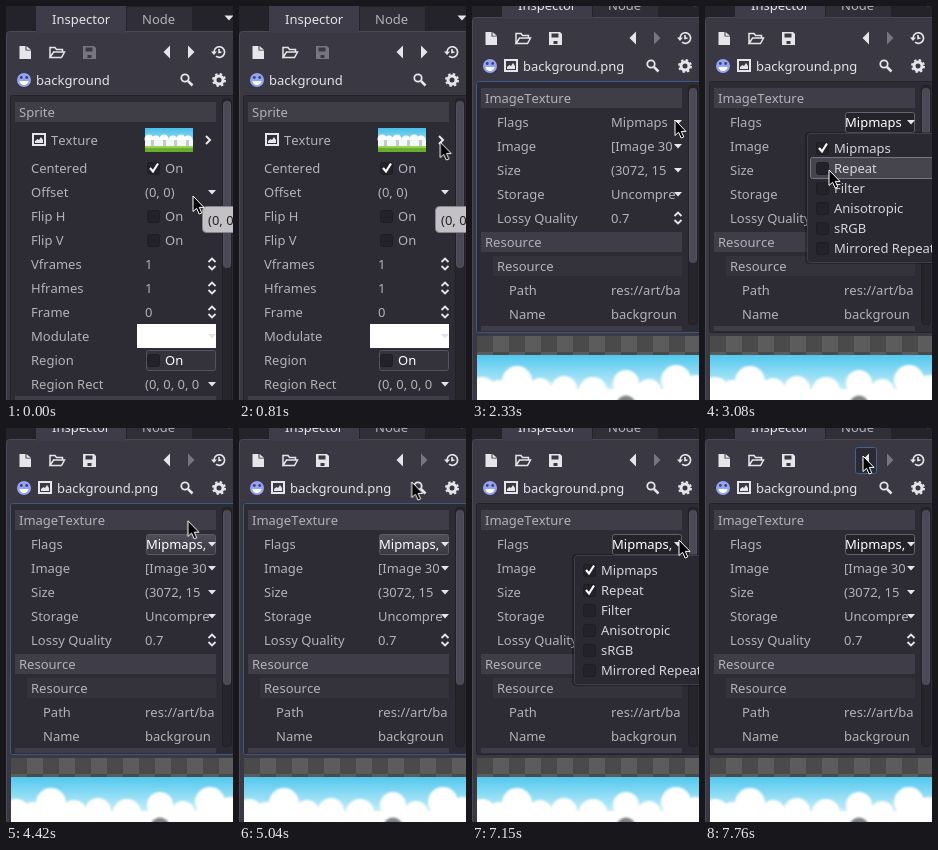
Animation, 227 px wide and 394 px high, one loop 8 s. Source, as an HTML page:

```html
<!DOCTYPE html>
<html lang="en">
<head>
<meta charset="utf-8">
<title>Inspector</title>
<style>
html, body { margin: 0; width: 100%; height: 100%; overflow: hidden; background: #25232a; }
svg { display: block; width: 227px; height: 394px; }
text { font: 13px "Noto Sans", "Open Sans", sans-serif; font-kerning: none; fill: #b4b2b8; white-space: pre; }
.lit { fill: #fff; }
.title { fill: #e4e3e8; }
.item { fill: #d6d5da; }
.clouds { filter: blur(1.3px); }

/* hard switches between states */
.sprite, .tip, .tex, .focus, .popup, .plain, .one, .two, .press, .soft, .back, .hover, .head {
  animation: 8s step-end infinite;
}
.head { animation-name: head; }
.sprite { animation-name: sprite; }
.tip { animation-name: tip; }
.tex { animation-name: tex; }
.focus { animation-name: focus; }
.popup { animation-name: popup; }
.plain { animation-name: plain; }
.one { animation-name: one; }
.two { animation-name: two; }
.press { animation-name: press; }
.soft { animation-name: soft; }
.back { animation-name: back; }
.hover { animation-name: hover; }
@keyframes head { 0% { transform: translate(0, 0); } 15.75%, 100% { transform: translate(0, -14px); } }
@keyframes sprite { 0% { opacity: 1; } 15.75%, 100% { opacity: 0; } }
@keyframes tip { 0% { opacity: 1; } 14.25%, 100% { opacity: 0; } }
@keyframes tex { 0% { opacity: 0; } 15.75%, 100% { opacity: 1; } }
@keyframes focus { 0%, 30.875%, 77.875%, 100% { opacity: 0; } 15.75%, 43.125% { opacity: 1; } }
@keyframes popup { 0%, 43.125%, 96.625%, 100% { opacity: 0; } 30.875%, 77.875% { opacity: 1; } }
@keyframes plain { 0% { opacity: 1; } 30.875%, 100% { opacity: 0; } }
@keyframes one { 0%, 43.125%, 100% { opacity: 0; } 30.875% { opacity: 1; } }
@keyframes two { 0% { opacity: 0; } 43.125%, 100% { opacity: 1; } }
@keyframes press { 0%, 43.125% { opacity: 0; } 30.875%, 77.875%, 100% { opacity: 1; } }
@keyframes soft { 0%, 77.875%, 100% { opacity: 0; } 43.125% { opacity: 1; } }
@keyframes back { 0% { opacity: 0; } 96.625%, 100% { opacity: 1; } }
@keyframes hover {
  0%, 43.125%, 100% { opacity: 0; transform: translate(0, 0); }
  34.375% { opacity: 1; transform: translate(0, 0); }
  36% { opacity: 1; transform: translate(0, 20px); }
}

.cursor { animation: cursor 8s ease-in-out infinite; }
@keyframes cursor {
  0%, 2.5% { transform: translate(187px, 190px); }
  11.625%, 24% { transform: translate(202px, 133px); }
  26.5% { transform: translate(199px, 124px); }
  29.125%, 31.25% { transform: translate(203px, 114px); }
  38.5% { transform: translate(124px, 164px); }
  40.25% { transform: translate(119px, 160px); }
  51% { transform: translate(119px, 160px); animation-timing-function: ease-in; }
  55.25% { transform: translate(182px, 93px); animation-timing-function: ease-out; }
  60.5%, 61.25% { transform: translate(154px, 22px); }
  65.6% { transform: translate(209px, 116px); }
  67.375% { transform: translate(209px, 112px); animation-timing-function: step-end; }
  72.25%, 89.375% { transform: translate(207px, 112px); }
  96.25%, 100% { transform: translate(158px, 28px); }
}
</style>
</head>
<body>
<svg id="stage" viewBox="0 0 227 394" xmlns="http://www.w3.org/2000/svg"></svg>
<script>
const rect = (x, y, w, h, fill, more = '') =>
  `<rect x="${x}" y="${y}" width="${w}" height="${h}" fill="${fill}" ${more}/>`;
const box = (x, y, w, h, fill, line, r = 2) =>
  rect(x + .5, y + .5, w - 1, h - 1, fill, `stroke="${line}" rx="${r}"`);
const text = (x, mid, s, cls = '') => `<text x="${x}" y="${mid + 5}" class="${cls}">${s}</text>`;
const path = (d, fill = '#e6e6ea', more = '') => `<path d="${d}" fill="${fill}" ${more}/>`;
const line = (d, w = 1.5, color = '#e6e6ea') => path(d, 'none', `stroke="${color}" stroke-width="${w}"`);
const disc = (x, y, r, fill, more = '') => `<circle cx="${x}" cy="${y}" r="${r}" fill="${fill}" ${more}/>`;
const group = (cls, ...parts) => `<g class="${cls}">${parts.join('')}</g>`;

const drop = (y, color) => path(`M202 ${y - 2}h8l-4 4.5z`, color);
const spin = y => line(`M202.5 ${y - 2}l3.5-3.5 3.5 3.5M202.5 ${y + 2}l3.5 3.5 3.5-3.5`, 1.8);
const check = (x, y, on) => box(x, y - 6, 13, 13, '#242229', '#1f1d24')
  + (on ? line(`M${x + 3} ${y}l3 3.5 5-8`, 2.2, '#fff') : '');
const category = (y, s) => rect(9, y - 10, 201, 20, '#3f3d48') + text(13, y, s);
const picture = (x, y) => path(`M${x} ${y}h14v13h-14zM${x + 2} ${y + 2}v9h10v-9z`, '#e6e6ea', 'fill-rule="evenodd"')
  + path(`M${x + 3} ${y + 10}v-2l2.5-2 1.5 1 2-3 2 3v3z`);
const scroll = (y, h, top, tall) => box(216, y, 10, h, '#27252c', '#222027', 3)
  + box(217, top, 8, tall, '#4b4955', '#53515d', 3);

const icons =
  path('M13.5 40h6v4.5h5.5v8.5h-11.5zM20.5 40l4.5 3.8h-4.5z')
  + line('M44 51.5v-10h5l1.5 2h6v2.5M44 51.5l3.5-5.5h11l-3 5.5z')
  + line('M215.5 46l-2.5 .5v-3.5M208 46a5.3 5.3 0 1 1 2 4.2', 1.7) + path('M205 45.5h6l-3 3.6z')
  + disc(18, 74, 7, '#94a4f4') + disc(15.3, 71.5, 1.4, '#3c4274') + disc(20.7, 71.5, 1.4, '#3c4274')
  + path('M13.5 75h9a4.5 4 0 0 1-9 0z', '#fff')
  + disc(179, 72, 3.7, 'none', 'stroke="#e6e6ea" stroke-width="1.8"') + line('M182 75l4.5 4.5', 2.5)
  + disc(213, 74, 4, 'none', 'stroke="#e6e6ea" stroke-width="3"')
  + disc(213, 74, 6, 'none', 'stroke="#e6e6ea" stroke-width="2" stroke-dasharray="2.36"');
const floppy = color => path('M77 40h11l2 2v11h-13zM79.5 41.5v4h7v-4zM81.5 49v3h4v-3z', color, 'fill-rule="evenodd"');
const forward = color => path('M182 39.5v13l6.5-6.5z', color);

const head = group('head',
  rect(0, 0, 227, 30, '#25232a'),
  rect(121, 1, 65, 25, '#302e37'),
  box(0, 25, 240, 420, '#3a3843', '#4a4855', 3),
  rect(30, 0, 90, 27, '#3e3c48'),
  text(46, 13, 'Inspector', 'title'), text(136, 13, 'Node'),
  path('M218.5 9.5h9l-4.5 5z'),
  group('back', box(150, 33, 22, 27, '#292a34', '#46618c')),
  icons, path('M164 39.5v13l-6.5-6.5z'),
  group('sprite', floppy('#77757f'), forward('#e6e6ea'), text(30, 74, 'background', 'title')),
  group('tex', floppy('#e6e6ea'), forward('#77757f'), picture(32, 67), text(51, 74, 'background.png', 'title')));

const labels = (x, list) => list.map(([y, s]) => text(x, y, s)).join('');
const sprite = group('sprite',
  box(4, 89, 230, 310, '#2d2b33', '#25232a'),
  category(106, 'Sprite'), rect(9, 390, 201, 4, '#3f3d48'),
  picture(26, 127), text(45, 134, 'Texture'),
  labels(25, [[162, 'Centered'], [186, 'Offset'], [210, 'Flip H'], [234, 'Flip V'], [258, 'Vframes'],
    [282, 'Hframes'], [306, 'Frame'], [330, 'Modulate'], [354, 'Region'], [378, 'Region Rect']]),
  // thumbnail
  rect(139, 122, 48, 24, 'url(#sky)'),
  [143, 150, 158, 167, 175, 182].map((x, i) => disc(x, 133 + i % 2, 4.5, '#fff')).join(''),
  rect(139, 134, 48, 7, '#f2f7f7'),
  [145, 157, 168, 180].map(x => rect(x, 134, 3, 6, '#c3cccb')).join(''),
  rect(139, 140, 48, 6, '#68ad2b'), rect(139, 140, 48, 2, '#9bd052'),
  line('M200 130l4 4-4 4', 2),
  check(141, 162, true), check(141, 210), check(141, 234),
  labels(159, [[162, 'On'], [210, 'On'], [234, 'On']]),
  labels(139, [[186, '(0, 0)'], [258, '1'], [282, '1'], [306, '0'], [378, '(0, 0, 0, 0']]),
  drop(186), drop(378), spin(258), spin(282), spin(306),
  rect(131, 318, 79, 24, '#fff'), drop(330, '#e3e3e3'),
  box(140, 344, 70, 21, '#34323b', '#55535e'), check(141, 354), text(159, 354, 'On', 'lit'),
  scroll(92, 310, 95, 167));

const clouds = [[10, 385, 14], [45, 375, 15], [27, 386, 12], [68, 384, 12], [92, 383, 13], [121, 385, 14],
  [154, 377, 13], [177, 385, 12], [204, 374, 15], [224, 382, 13]];
const flags = group('plain', text(139, 116, 'Mipmaps'))
  + group('soft', box(140, 106, 70, 21, 'url(#soft)', '#5b5964'))
  + group('press', box(140, 106, 70, 21, '#25232a', '#64626d'))
  + group('one', text(140, 116, 'Mipmaps', 'lit'))
  + group('two', text(140, 116, 'Mipmaps,', 'lit'));
const texture = group('tex',
  box(4, 75, 230, 252, '#2d2b33', '#25232a'),
  category(92, 'ImageTexture'), category(236, 'Resource'),
  rect(21, 250, 189, 20, '#34323b'), rect(9, 320, 201, 5, '#3f3d48'),
  labels(25, [[116, 'Flags'], [140, 'Image'], [164, 'Size'], [188, 'Storage'], [212, 'Lossy Quality'], [260, 'Resource']]),
  labels(37, [[284, 'Path'], [308, 'Name']]),
  labels(139, [[140, '[Image 30'], [164, '(3072, 15'], [188, 'Uncompre'], [212, '0.7'],
    [284, 'res://art/ba'], [308, 'backgroun']]),
  flags, drop(116), drop(140), drop(164), drop(188), spin(212),
  scroll(79, 240, 82, 175),
  group('focus', box(4, 75, 230, 252, 'none', '#3d5a85')),
  // preview
  rect(5, 330, 222, 64, 'url(#checker)'), rect(5, 349, 222, 45, 'url(#day)'),
  '<g clip-path="url(#view)">',
  group('clouds', ...clouds.map(c => disc(...c, '#fff')), rect(-5, 383, 242, 20, '#fff'),
    disc(154, 399, 9.5, '#7d8283')), '</g>');

const items = ['Mipmaps', 'Repeat', 'Filter', 'Anisotropic', 'sRGB', 'Mirrored Repeat'];
const popup = group('popup',
  rect(100, 126, 130, 132, '#000', 'opacity=".25" rx="4"'),
  box(102, 127, 140, 130, '#2a2830', '#403e48', 3),
  group('hover', box(105, 131, 140, 22, '#46444d', '#77757e')),
  items.map((s, i) => check(111, 142 + 20 * i, !i) + text(129, 142 + 20 * i, s, 'item')).join(''),
  group('two', check(111, 162, true)));

const tip = group('tip', box(196, 200, 60, 27, '#c3c1c5', '#88868c', 4),
  '<text x="202" y="219" style="fill:#222">(0, 0)</text>');
const cursor = group('cursor',
  path('M0 0V15.5L3.6 12.3 6.2 18 8.8 16.9 6.3 11.4H11z', '#000', 'stroke="#fff" stroke-linejoin="round"'));

const fade = (id, a, b) => `<linearGradient id="${id}" x2="0" y2="1"><stop stop-color="${a}"/><stop offset="1" stop-color="${b}"/></linearGradient>`;
const defs = `<defs>${fade('sky', '#48bfe8', '#d6f3fb')}${fade('day', '#52c8ee', '#e9fafe')}${fade('soft', '#504e59', '#393741')}
<pattern id="checker" x="5" y="330" width="32" height="32" patternUnits="userSpaceOnUse">
${rect(0, 0, 32, 32, '#4a4a4a')}${rect(16, 0, 16, 16, '#5c5c5c')}${rect(0, 16, 16, 16, '#5c5c5c')}</pattern>
<clipPath id="view"><rect x="5" y="349" width="222" height="45"/></clipPath></defs>`;

document.getElementById('stage').innerHTML = defs + head + sprite + texture + popup + tip + cursor;
</script>
</body>
</html>
```
